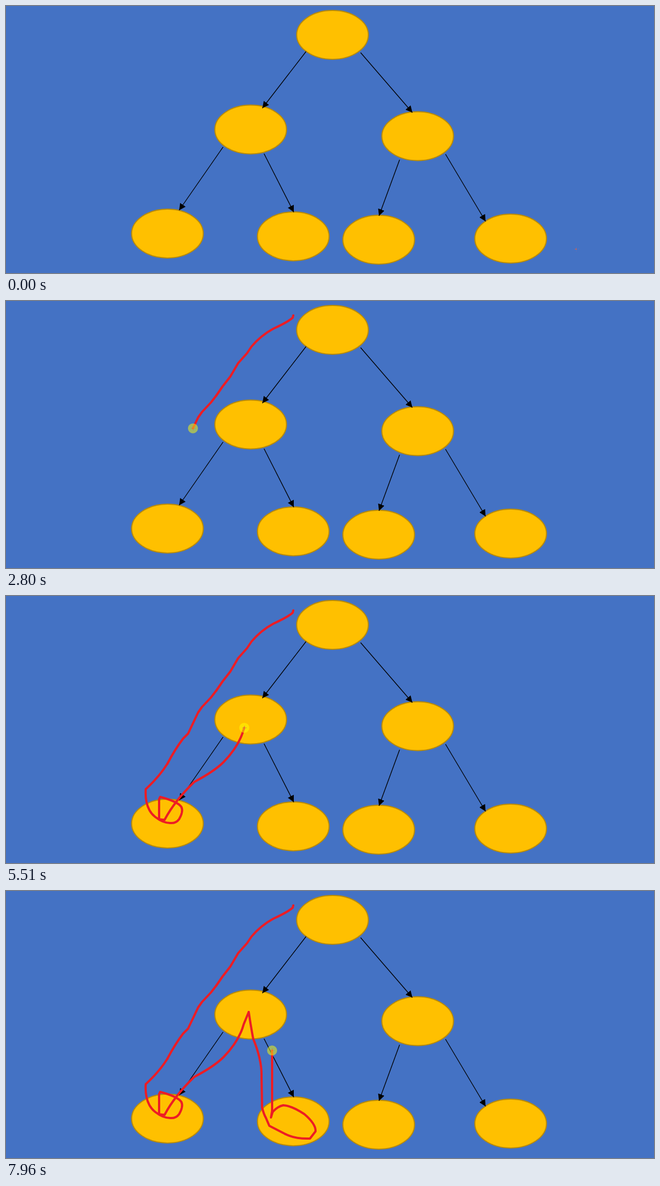
An HTML page for the animation above (8000 ms loop, 1164 by 481 pixels).

```html
<!DOCTYPE html>
<html lang="en">
<head>
<meta charset="utf-8">
<title>Tree traversal</title>
<style>
  html, body { margin: 0; width: 100%; height: 100%; overflow: hidden; background: #4472c4; }
  svg { display: block; }
  #node { fill: #ffc000; stroke: #bc8c00; stroke-width: 2; }
  .arrows path { stroke: #000; stroke-width: 1.3; marker-end: url(#head); }
  .legs path { fill: none; stroke: #ed1c24; stroke-width: 4; stroke-linecap: round; stroke-linejoin: round; }
  .legs .hover { stroke: none; }
</style>
</head>
<body>
<svg width="1164" height="481" viewBox="0 0 1164 481">
  <defs>
    <ellipse id="node" rx="64.3" ry="43.9"/>
    <marker id="head" markerUnits="userSpaceOnUse" markerWidth="12" markerHeight="12" refX="12" refY="6" orient="auto">
      <path d="M0 0 L12 6 L0 12 Z"/>
    </marker>
  </defs>

  <use href="#node" x="586.5" y="52"/>
  <use href="#node" x="439.5" y="222.5"/>
  <use href="#node" x="739.5" y="234.5"/>
  <use href="#node" x="290" y="410"/>
  <use href="#node" x="516" y="415"/>
  <use href="#node" x="669.5" y="421"/>
  <use href="#node" x="906.5" y="419"/>

  <g class="arrows">
    <path d="M539 82 L460.500 184"/>
    <path d="M637 84 L730 192"/>
    <path d="M390 254 L311 368"/>
    <path d="M463.500 266 L517 371.500"/>
    <path d="M707 277 L670 378"/>
    <path d="M789.500 267 L861.500 388"/>
  </g>

  <!-- The pointer's way, leg by leg; data-ease above 1 slows down towards the end -->
  <g class="legs">
    <path class="hover" d="M1024 438 L421 99 L468 48"/>
    <path class="hover" data-ease="3.5" d="M468 48 L516 26"/>
    <path d="M516 26 L515 30 Q508 37 480 50 Q458 62 441 82 L433 94 L417 112 L403 136 L389 154 L378 170"/>
    <path data-ease="0.78" d="M378 170 L368 183 L352 200 L345 210 L327 248 L318 257 Q303 277 290 302"/>
    <path data-ease="1.2" d="M290 302 Q275 326 251 348 Q249 383 268 398 Q282 409 295 409"/>
    <path d="M295 409 Q305 410 311 402 Q319 388 315 380 Q308 370 277 362 L275 366 V402 L281 403"/>
    <path data-ease="1.9" d="M281 403 H285 Q303 369 338 335 Q374 316 391 299 Q419 270 427 240 L436 218"/>
    <path data-ease="1.28" d="M436 218 Q440 245 444 266 Q460 305 459 335 L460 390 Q463 402 467 409 L473 423 L502 438"/>
    <path d="M502 438 Q520 447 546 446 L556 433 Q557 420 536 402 Q514 387 498 386 Q488 388 479 398"/>
    <path d="M479 398 L476 408 L478 396 V178"/>
  </g>

  <g id="pointer">
    <circle id="press" r="9" fill="#ff0" fill-opacity="0.5"/>
    <path d="M-3 0 h1 M3 0 h1 M0 -3 h1 M0 3 h1" stroke="#8d6f9c"/>
    <rect x="-1" y="-1" width="2" height="2" fill="#e8603c"/>
  </g>
</svg>
<script>
const LOOP = 8000, STEP = 77.5, LEG_STEPS = 11, FIRST_LEG = 700, PRESS_STEP = 10;
const pointer = document.getElementById('pointer');
const press = document.getElementById('press');
const legs = [...document.querySelectorAll('.legs path')].map(path => ({
  path,
  length: path.getTotalLength(),
  ease: Number(path.dataset.ease || 1)
}));

// Share of a leg done; the opening sweep is shorter than the others
function progress(i, step) {
  const u = i === 0 ? (step + 8) / 7 : step / LEG_STEPS - (i - 1);
  return 1 - (1 - Math.min(1, Math.max(0, u))) ** legs[i].ease;
}

function draw(now) {
  const step = Math.floor((now % LOOP - FIRST_LEG) / STEP) + 1;
  let spot = legs[0].path.getPointAtLength(0);
  legs.forEach(({ path, length }, i) => {
    const done = progress(i, step) * length;
    path.style.display = done > 0 ? '' : 'none';
    path.style.strokeDasharray = `${done} ${length + 9}`;
    if (done > 0) spot = path.getPointAtLength(done);
  });
  pointer.setAttribute('transform', `translate(${spot.x} ${spot.y})`);
  press.style.display = step >= PRESS_STEP ? '' : 'none';
  requestAnimationFrame(draw);
}
requestAnimationFrame(draw);
</script>
</body>
</html>
```
